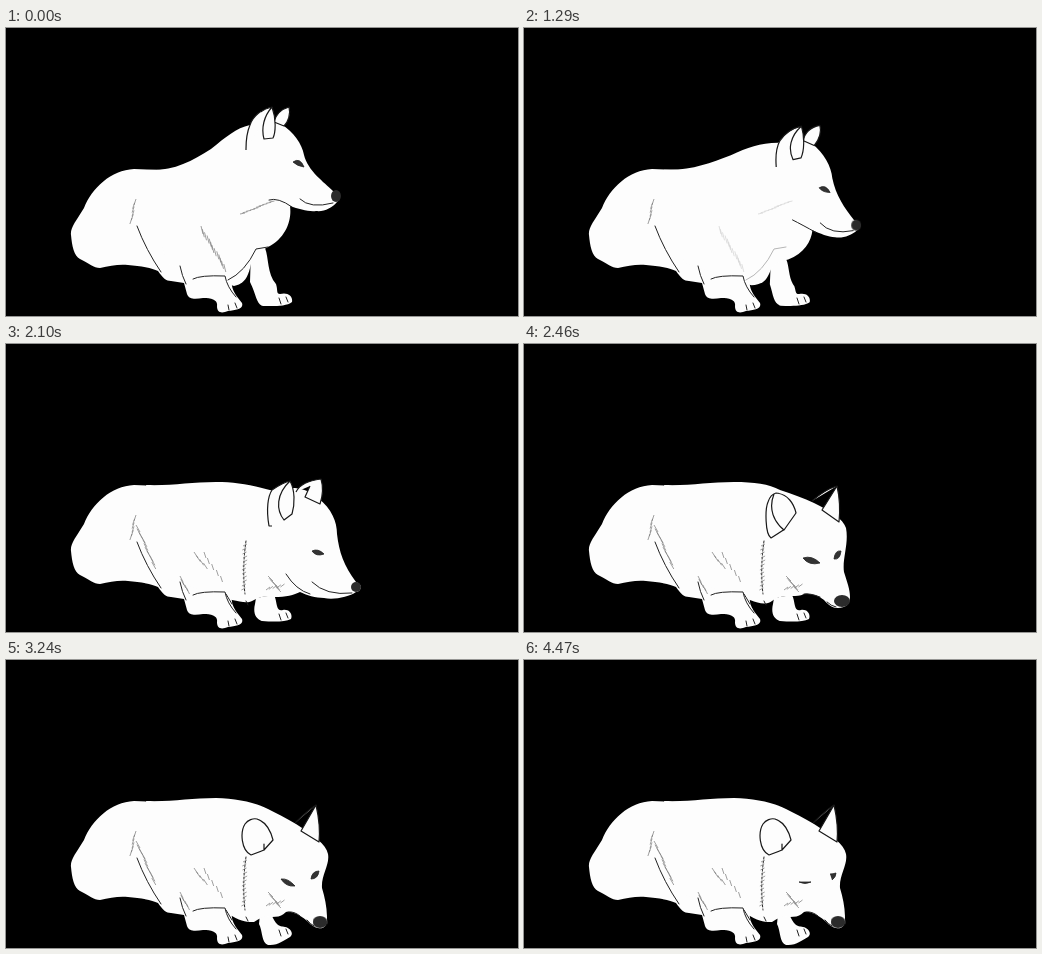
These frames come from a looping animation (512x288 px, 4500 ms). An HTML page:

```html
<!DOCTYPE html>
<html lang="en">
<head>
<meta charset="utf-8">
<title>Sleepy dog</title>
<style>
html, body { margin: 0; width: 100%; height: 100%; overflow: hidden; background: #000; }
svg { display: block; width: 100%; height: 100%; }
.fur { fill: #fdfdfd; }
.ink { fill: none; stroke: #222; stroke-width: 1; stroke-linecap: round; }
.ear { fill: #fdfdfd; stroke: #181818; stroke-width: 1.2; stroke-linejoin: round; }
.eye { fill: #333; stroke: #222; stroke-width: .8; stroke-linejoin: round; }
.hatch { fill: none; stroke: #777; stroke-width: .7; }
.move { animation: 4.5s linear infinite; }
#head { animation-name: head; }
#leg { animation-name: leg; }
#nearEar { animation-name: nearEar; }
#farEar { animation-name: farEar; }
#nearEye { animation-name: nearEye; }
#farEye { animation-name: farEye; }
#mouth { animation-name: mouth; }
#nose { animation-name: nose; }
#up { animation-name: up; }
#down { animation-name: down; }

/* upright, lowered, turning, facing, resting */
@keyframes head {
  0%, 25% { d: path("M140 142 C165 144 185 134 205 121 C220 109 230 100 244 97 C250 92 262 90 275 96 C288 104 296 116 298 127 C302 143 318 154 327 163 C334 162 336 170 331 174 C326 180 318 184 310 183 C303 184 293 181 284 178 C286 192 280 210 262 219 C258 222 248 222 245 236 C242 250 238 256 228 258 L160 235 Z"); }
  35%, 37.5% { d: path("M140 141 C165 142 185 138 210 138 C230 137 245 141 272 145 C280 140 292 138 310 149 C320 160 327 178 326 190 C328 208 325 225 336 243 C343 244 342 251 336 251 C330 254 320 256 313 254 C306 252 302 248 296 244 C290 249 280 253 268 253 C262 252 254 252 248 256 C242 260 236 258 226 256 L160 235 Z"); }
  43%, 48% { d: path("M140 141 C165 142 185 138 210 138 C230 138 245 141 268 147 C280 143 298 141 312 154 C326 165 331 178 331 190 C333 208 338 222 350 238 C357 240 356 247 350 248 C343 253 328 256 318 254 C310 254 300 251 294 248 C288 251 280 253 268 253 C262 252 254 252 248 256 C242 260 236 258 226 256 L160 235 Z"); }
  54%, 59% { d: path("M140 141 C165 142 185 138 210 138 C230 138 245 140 256 146 C268 150 280 154 290 159 C308 168 319 175 322 184 C325 200 318 215 320 228 C323 238 326 245 326 253 C326 263 318 264 312 264 C306 263 303 259 300 256 C294 251 286 249 280 250 C276 252 272 252 268 252 C262 252 254 252 248 257 C242 261 236 260 226 256 L160 235 Z"); }
  66%, 100% { d: path("M140 141 C165 142 185 138 210 138 C230 138 250 143 262 149 C270 153 280 158 290 164 C308 176 320 184 322 194 C324 205 315 215 316 228 C319 238 321 248 321 258 C321 268 316 269 312 268 C306 267 303 262 300 260 C294 255 286 251 280 252 C276 256 272 257 266 257 C260 255 254 258 248 262 C242 262 236 262 226 256 L160 235 Z"); }
}
@keyframes leg {
  0%, 25% { d: path("M245 222 L259 220 C263 230 261 246 270 256 C272 262 270 266 274 266 C282 264 287 268 286 274 C280 279 265 278 257 278 C250 276 251 268 244 254 Z"); }
  35%, 59% { d: path("M250 254 L268 251 C270 255 270 258 271 262 C272 266 274 267 277 266 C283 265 287 270 285 275 C279 278 268 278 256 277 C249 275 247 268 249 260 Z"); }
  66%, 100% { d: path("M254 254 L266 256 C268 260 269 262 271 264 C274 267 276 266 279 267 C285 268 288 274 284 277 C278 280 272 286 262 285 C255 282 257 272 253 264 Z"); }
}
@keyframes nearEar {
  0%, 25% { d: path("M240 122 L240 121 C240 112 241 104 244 97 C247 88 256 81 266 79 C270 90 270 104 267 110 L258 111 C255 100 258 88 266 79"); }
  35%, 37.5% { d: path("M273 168 L273 167 C271 155 271 147 276 140 C284 136 290 133 297 131 C299 142 298 155 294 164 L288 167 C279 158 280 142 297 131"); }
  43%, 48% { d: path("M266 182 L263 182 C260 165 262 152 266 146 C272 142 278 138 284 137 C289 146 289 160 286 170 L278 176 C270 166 270 150 284 137"); }
  54%, 59% { d: path("M261 185 L247 194 C241 190 241 165 244 158 C246 152 248 150 252 149 C264 150 270 160 272 169 L260 186 C250 178 244 165 250 150"); }
  66%, 100% { d: path("M258 190 L245 195 C235 190 234 172 239 164 C242 160 247 158 251 159 C260 162 265 172 267 180 L258 190 L258 184 Z M258 190"); }
}
@keyframes farEar {
  0%, 25% { d: path("M268 94 C270 86 276 81 283 79 C285 86 282 94 278 98 L268 94 L268 94"); }
  35%, 37.5% { d: path("M299 145 C298 138 304 130 318 129 C320 138 314 146 311 151 L299 145 L299 145"); }
  43%, 48% { d: path("M290 148 C294 140 302 137 315 135 C318 145 316 154 314 160 L299 153 L304 142"); }
  54%, 59% { d: path("M288 157 C296 150 306 144 313 142 C316 155 316 168 315 178 L298 166 L313 142"); }
  66%, 100% { d: path("M289 163 C296 156 304 149 310 145 C313 158 314 172 313 182 L295 171 L310 145"); }
}
@keyframes nearEye {
  0%, 25% { d: path("M287 134 Q294 129 298 139 Q291 138 287 134"); }
  35%, 37.5% { d: path("M309 204 Q315 202 320 208 Q312 210 309 204"); }
  43%, 48% { d: path("M306 207 Q312 204 318 210 Q310 213 306 207"); }
  54%, 59% { d: path("M279 214 Q288 211 296 219 Q285 222 279 214"); }
  66%, 75.5% { d: path("M275 219 Q282 218 289 226 Q280 227 275 219"); }
  81%, 100% { d: path("M275 222 Q281 222 287 222 Q281 225 275 222"); }
}
@keyframes farEye {
  0%, 49% { opacity: 0; d: path("M318 212 Q319 204 324 206 Q322 214 318 212"); }
  52% { opacity: 1; }
  54%, 59% { d: path("M310 215 Q311 206 317 207 Q316 216 310 215"); }
  66%, 75.5% { d: path("M305 219 Q306 211 313 211 Q312 219 305 219"); }
  81%, 100% { opacity: 1; d: path("M306 214 Q309 214 312 213 Q312 217 308 220"); }
}
@keyframes mouth {
  0%, 25% { d: path("M294 171 Q304 181 327 175 M263 172 Q272 169 286 179"); }
  35%, 37.5% { d: path("M300 236 Q312 252 333 250 M278 226 Q288 244 302 248"); }
  43%, 48% { d: path("M306 238 Q320 252 346 249 M280 230 Q290 246 304 250"); }
  54%, 59% { d: path("M312 263 Q307 262 303 258 M280 250 Q286 249 296 253"); }
  66%, 100% { d: path("M308 266 Q304 264 301 260 M282 252 Q288 251 294 256"); }
}
@keyframes nose {
  0%, 25% { transform: translate(330px, 168px) scale(5, 6); }
  35%, 37.5% { transform: translate(336px, 247px) scale(5, 4.5); }
  43%, 48% { transform: translate(350px, 243px) scale(5, 5); }
  54%, 59% { transform: translate(318px, 257px) scale(8, 6); }
  66%, 100% { transform: translate(314px, 262px) scale(7.5, 6); }
}
@keyframes up { 0%, 26% { opacity: 1; } 30%, 100% { opacity: 0; } }
@keyframes down { 0%, 29% { opacity: 0; } 34%, 100% { opacity: 1; } }
</style>
</head>
<body>
<svg viewBox="0 0 512 288">
  <path class="fur" d="M128 141 C105 142 86 160 78 180 C70 193 64 200 65 207 C66 218 68 228 74 231 C82 235 88 240 94 240 C104 238 112 236 122 237 C135 238 146 240 152 243 C157 250 160 253 165 253 L178 255 L181 266 C183 272 190 271 197 270 C206 270 212 272 211 278 C211 286 217 285 222 283 C230 282 238 281 236 275 C232 270 227 264 226 258 L225 250 L250 200 L240 150 L190 140 Q160 143 128 141 Z"/>
  <path class="fur move" id="leg"/>
  <path class="fur move" id="head"/>
  <path class="ear move" id="farEar"/>
  <path class="ear move" id="nearEar"/>
  <path class="ink" d="M131 198 Q140 222 155 244 M174 238 Q176 248 180 256 M187 251 Q194 247 219 248 Q221 259 230 269 M222 277 l1 5 M229 275 l2 5 M273 270 l2 6 M280 269 l2 5"/>
  <g class="move" id="up">
    <path class="ink" d="M222 252 Q239 244 250 221 L262 219"/>
  </g>
  <g class="move" id="down">
    <path class="ink" d="M240 197 Q236 225 239 250" stroke-dasharray="2 2"/>
    <path class="ink" d="M220 250 L226 260 M240 257 l2 4"/>
  </g>
  <path class="ink move" id="mouth"/>
  <path class="eye move" id="nearEye"/>
  <path class="eye move" id="farEye"/>
  <circle class="move" id="nose" r="1" fill="#2b2b2b"/>
</svg>
<script>
const svg = document.querySelector('svg');

// n short strokes (dx, dy) spread along a line
function hatch(parent, x0, y0, x1, y1, n, dx, dy) {
  const path = document.createElementNS(svg.namespaceURI, 'path');
  let d = '';
  for (let i = 0; i < n; i++) {
    const t = i / (n - 1);
    const x = x0 + (x1 - x0) * t + Math.sin(i * 5) * 0.6;
    const y = y0 + (y1 - y0) * t;
    d += `M${x.toFixed(1)} ${y.toFixed(1)}l${dx} ${dy}`;
  }
  path.setAttribute('class', 'hatch');
  path.setAttribute('d', d);
  parent.append(path);
}

const up = document.getElementById('up');
const down = document.getElementById('down');
hatch(svg, 130, 171, 126, 190, 6, -2, 6);
hatch(up, 195, 198, 218, 236, 13, 2, 8);
hatch(up, 234, 186, 263, 174, 10, 5, -1);
hatch(down, 130, 181, 146, 218, 11, 4, 7);
hatch(down, 188, 208, 197, 219, 4, 4, 6);
hatch(down, 198, 208, 214, 232, 5, 2, 6);
hatch(down, 174, 232, 180, 244, 5, 3, 6);
hatch(down, 237, 202, 236, 246, 12, 4, -2);
hatch(down, 262, 232, 270, 243, 6, 5, 5);
hatch(down, 260, 246, 274, 243, 5, 4, -3);
</script>
</body>
</html>
```
